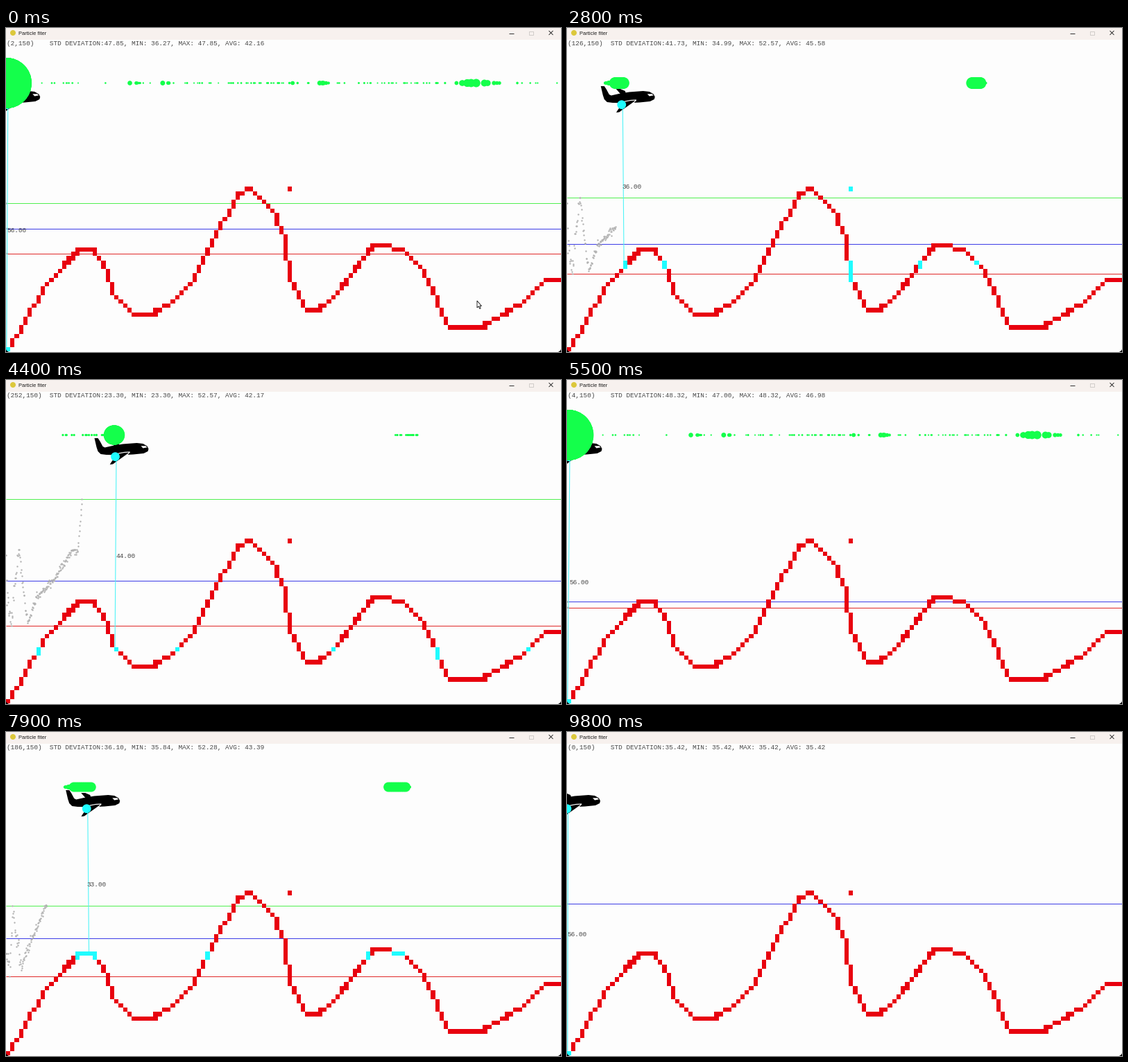
A matplotlib script for the animation above (9900 ms loop, 800 px wide and 468 px high).

```python
import numpy as np
import matplotlib.pyplot as plt
from matplotlib.animation import FuncAnimation
from matplotlib.colors import to_rgba
from matplotlib.patches import Circle, Polygon, Rectangle

W, H, DPI = 800, 468, 100
PX = 72 / DPI              # points per pixel
CELL, TOP = 6.25, 17       # grid cell size, height of the title bar
UNIT = 0.625               # pixels per simulation unit
FRAMES = 99
RESET, END = 55, 98        # frames where a new run starts

PAPER, RED, CYAN, GREEN = "#fdfdfd", "#e8000e", "#1ffcff", "#14ff4b"
MONO = dict(family="Liberation Mono", size=9.375 * PX, color="#484848")

rng = np.random.default_rng(7)


def curve(keys, x):
    return np.interp(x, *zip(*keys))


# ---------------------------------------------------------------- terrain
COLS, ROWS = 128, 72
HILLS = [(0, 71), (8, 57), (16, 48), (20, 48), (23, 53), (25, 59), (29, 63),
         (33, 63), (38, 60), (42, 56), (46, 48), (53, 35), (56, 34), (62, 40),
         (64, 45), (66, 56), (69, 62), (71, 62), (75, 59), (84, 47), (88, 47),
         (89, 48), (91, 48), (96, 53), (98, 57), (102, 66), (109, 66),
         (119, 60), (124, 55), (127, 55)]


def hill_row(col):
    return np.floor(curve(HILLS, col) + 0.5).astype(int)


# each column reaches down far enough to touch its lower neighbour
cols = np.arange(COLS)
tops = hill_row(cols)
edges = np.maximum(hill_row(cols - 0.49), hill_row(cols + 0.49))
neighbours = np.maximum(hill_row(cols - 1), hill_row(cols + 1)) - 1
bottoms = np.maximum(edges, neighbours)
rows = np.arange(ROWS)[:, None]
ground = (rows >= tops) & (rows <= bottoms)
ground[34, 65] = True      # lone cell beside the peak


def terrain_image(row):
    img = np.zeros((ROWS, COLS, 4))
    img[ground] = to_rgba(RED)
    img[ground & (tops == row)] = to_rgba(CYAN)
    return img


# ------------------------------------------------- deviation over each run
DEVIATION = [
    [(0, 36.27), (2, 47.85), (12, 52.57), (29, 34.99), (45, 49.07),
     (51, 51.5), (70, 46), (112, 41.73), (152, 35.2), (165, 35.5),
     (175, 23.3), (220, 3)],
    [(0, 47), (8, 52.28), (14, 35.98), (20, 41.5), (35, 50.8), (40, 48.29),
     (91, 35.84), (93, 36.1), (126, 23), (165, 3)],
    [(0, 35.42)]]
AVERAGE = [
    [(0, 36.27), (2, 42.16), (45, 45.8), (112, 45.58), (175, 42.17),
     (220, 36)],
    [(0, 47), (40, 46.53), (93, 43.39), (165, 34.5)],
    [(0, 35.42)]]


def make_trace(keys):
    """Key curve with noise that calms down, inside the running extremes."""
    steps = np.arange(keys[-1][0] + 1)
    base = curve(keys, steps)
    noise = rng.normal(0, 0.5 + 4 * np.exp(-steps / 14))
    noise[[s for s, _ in keys]] = 0
    return np.clip(base + noise, np.minimum.accumulate(base),
                   np.maximum.accumulate(base))


TRACES = [make_trace(keys) for keys in DEVIATION]


def state(f):
    """Run index, frames since its start, step in the run, plane position."""
    if f < RESET:
        step = round(2 + 3.93 * f)
        return 0, f, step, max(step, 2 * step - 98)
    if f < END:
        step = round(40 + 3.786 * (f - 65))
        return 1, f - RESET, step, 2 * step
    return 2, 0, 0, 0


def level(dev):
    return 26.15 + CELL * dev


# --------------------------------------------------------------- particles
RADIUS = [[(0, 36.5), (3, 18), (11, 10.5), (28, 8.5), (44, 14)],
          [(0, 36.5), (3, 18), (10, 13.7), (24, 7), (36, 14)]]
SPREAD = np.sort(rng.random(18))

seed_x = rng.uniform(40, 795, 130)
seed_r = 1 + 0.4 * rng.random(130)
for mid, height, width in [(176, 2.3, 13), (227, 2.5, 9), (414, 1.6, 5),
                           (453, 2.2, 12), (676, 5, 26), (725, 1.6, 12)]:
    seed_r += height * np.exp(-((seed_x - mid) / width) ** 2)


def core(mid, width, r):
    return mid + width * np.linspace(-0.5, 0.5, 9), np.full(9, r)


def trail(x0, x1, r0, r1):
    return x0 + (x1 - x0) * SPREAD, r0 + (r1 - r0) * SPREAD


def particles(run, age, cx):
    """Centres and radii: a swarm at the plane, its mirror, and strays."""
    if run == 2:
        return np.empty(0), np.empty(0)
    r = curve(RADIUS[run], age)
    width = 1 + 24 * min(7 / r, 1) ** 4
    grown = np.clip(age / 5, 0, 1)
    spent = np.clip((age - 28) / 14, 0, 1)
    mid = cx - 1 - width / 5
    back = mid - width / 2 - r
    far = max(645 - 0.7 * cx, 563)
    far_r = min(r, 13.7) * grown * (1 - spent)
    stray = grown * np.clip(1.6 - age / 15, 0, 1)
    parts = [core(mid, width, r),
             trail(back - 7 - 58 * spent, back + 3, 1.6, 4 - 2.4 * spent),
             core(far, width, far_r),
             trail(far - 5 * spent, far + width / 2 + far_r + 30 * spent,
                   1.4 * grown, 1.6 * grown),
             trail(660, 735, 1.5 * stray, 3.5 * stray)]
    if age < 3:
        parts.append((seed_x, seed_r * (1 - age / 3)))
    return [np.concatenate(group) for group in zip(*parts)]


# ------------------------------------------------------------------ figure
fig = plt.figure(figsize=(W / DPI, H / DPI), dpi=DPI, facecolor=PAPER)
ax = fig.add_axes([0, 0, 1, 1])
ax.axis("off")

terrain = ax.imshow(terrain_image(0), interpolation="nearest", aspect="auto",
                    extent=(0, W, TOP + ROWS * CELL, TOP), zorder=3)
ax.set_xlim(0, W)
ax.set_ylim(H, 0)


def shape(points, color, z, **kw):
    return ax.add_patch(Polygon(points, fc=color, zorder=z, **kw))


def stroke(xs, ys, color, width=1.0, z=9):
    return ax.plot(xs, ys, color=color, lw=width * PX, zorder=z,
                   solid_capstyle="butt")[0]


# window frame
ax.add_patch(Rectangle((0, 0), W, TOP - 0.5, fc="#f7f1ee", lw=0, zorder=8))
ax.add_patch(Circle((10, 7), 4, fc="#dcc83c", lw=0, zorder=9))
ax.text(18, 9.8, "Particle fiter", family="Liberation Sans", size=7.5 * PX,
        color="#1a1a1a", zorder=9)
stroke([725, 732], [7.5, 7.5], "#333333")
stroke([754, 759.5, 759.5, 754, 754], [4.5, 4.5, 9.5, 9.5, 4.5],
       "#c8c4c2", 0.8)
stroke([782.5, 788.5], [4, 10], "#222222", 0.9)
stroke([782.5, 788.5], [10, 4], "#222222", 0.9)
for x, side in ((0, 1), (W, -1)):
    shape([(x, H), (x, H - 4), (x + side, H - 2), (x + 4 * side, H)],
          "black", 9, lw=0)

cursor = shape([(679, 394), (679, 404), (681.2, 402), (682.8, 405.5),
                (684.2, 405), (682.8, 401.5), (685.5, 401.5)],
               "white", 9, ec="black", lw=0.8 * PX)

# aircraft outlines, x relative to the sensor
FAR_WING = [(-8, 88), (-2, 88), (5, 91), (6, 94), (-1, 96)]
BODY = [(-30, 84), (-25, 84), (-22, 88.5), (-18, 96), (-15, 97.5), (-4, 95),
        (11, 92.5), (31, 91), (40, 92), (46, 95.5), (48, 99.5), (47, 103),
        (41, 106), (26, 107.5), (6, 108.5), (-13, 108), (-21, 107),
        (-25, 103), (-27, 97)]
NEAR_WING = [(13, 104.5), (21, 104), (18, 107), (11, 112), (1, 119),
             (-3, 122), (-9, 123), (-6, 118), (0, 110), (5, 106)]
WINDOW = [(37, 95.3), (44, 95.3), (46, 97.3), (40, 98.5)]
plane = [(shape(pts, col, 4 + i / 10, ec=edge, lw=1.2 * PX),
          np.array(pts, float))
         for i, (pts, col, edge) in enumerate([
             (FAR_WING, "black", "none"), (BODY, "black", "none"),
             (NEAR_WING, "black", PAPER), (WINDOW, PAPER, "none")])]

marks = [stroke([0, W], [0, 0], col, 1, 1)
         for col in ("#50f050", "#e02828", "#3c3ce6")]
history = ax.scatter([], [], s=(2.4 * PX) ** 2, c="#b2b2b2", lw=0, zorder=2)
beam = stroke([0, 0], [0, 0], "#50f4f8", 1.1, 4.8)
sensor = ax.add_patch(Circle((0, 110.75), 6.4, fc=CYAN, lw=0, zorder=5))
cloud = ax.scatter([], [], s=[], c=GREEN, lw=0, zorder=6)
header = ax.text(0.6, 25, "", zorder=7, **MONO)
reading = ax.text(0, 0, "", zorder=7, **MONO)


def update(f):
    run, age, step, x = state(f)
    cx = x * UNIT
    col = int(x / 10 + 0.5)
    row = tops[col]
    dist = row - 15

    terrain.set_data(terrain_image(row))
    for patch, pts in plane:
        patch.set_xy(pts + (cx, 0))
    sensor.center = (cx, 110.75)
    beam.set_data([cx + 1.5, col * CELL + 0.8], [111, TOP + row * CELL])
    reading.set_text(f"{dist:.2f}")
    reading.set_position((cx + 0.6, 119.6 + dist * CELL / 2))

    trace = TRACES[run][:step + 1]
    low, high = trace.min(), trace.max()
    avg = curve(AVERAGE[run], step)
    for line, dev in zip(marks, (low, high, avg)):
        y = np.floor(level(dev)) + 0.5
        line.set_ydata([y, y])
    history.set_offsets(np.column_stack(
        [np.arange(len(trace)) * UNIT, level(trace)]))
    where = f"({x},150)"
    header.set_text(f"{where:<11}STD DEVIATION:{trace[-1]:.2f}, "
                    f"MIN: {low:.2f}, MAX: {high:.2f}, AVG: {avg:.2f}")

    xs, rs = particles(run, age, cx)
    cloud.set_offsets(np.column_stack([xs, np.full(len(xs), 79.5)]))
    cloud.set_sizes((2 * rs * PX) ** 2)
    cursor.set_visible(f < 3)
    return []


anim = FuncAnimation(fig, update, frames=FRAMES, interval=100, repeat=True)
plt.show()
```
